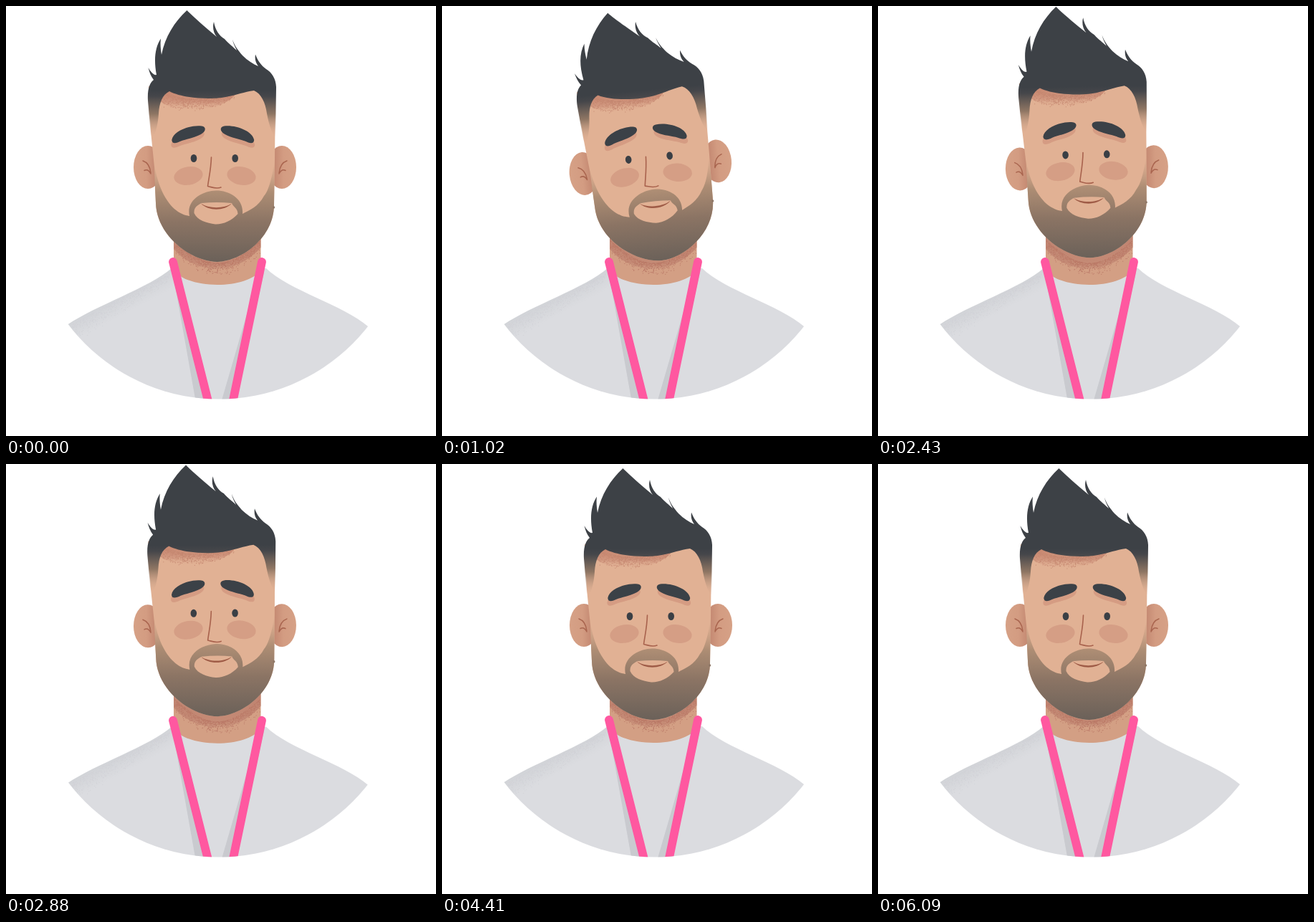
Recreate the animation shown at these times as an HTML page. Size 600 by 600 pixels, loop 6.15 s.

```html
<!DOCTYPE html>
<html lang="en">
<head>
<meta charset="utf-8">
<title>Portrait</title>
<style>
  html, body { margin: 0; width: 100%; height: 100%; overflow: hidden; background: #fff; }
  svg { display: block; width: 100vw; height: 100vh; }
</style>
</head>
<body>
<svg viewBox="0 0 600 600">
  <defs>
    <clipPath id="disc"><circle cx="297" cy="284.5" r="264"/></clipPath>
    <linearGradient id="shirtFill" gradientUnits="userSpaceOnUse" x1="150" y1="411" x2="161" y2="432">
      <stop offset="0" stop-color="#d2d4d8"/>
      <stop offset="1" stop-color="#dbdce0"/>
    </linearGradient>
    <linearGradient id="hairFill" gradientUnits="userSpaceOnUse" x1="0" y1="118" x2="0" y2="184">
      <stop offset="0" stop-color="#3d4146"/>
      <stop offset=".12" stop-color="#45464a"/>
      <stop offset=".5" stop-color="#8b7361" stop-opacity=".95"/>
      <stop offset="1" stop-color="#e1b194" stop-opacity="0"/>
    </linearGradient>
    <linearGradient id="beardFill" gradientUnits="userSpaceOnUse" x1="0" y1="218" x2="0" y2="357">
      <stop offset="0" stop-color="#c49a7e" stop-opacity="0"/>
      <stop offset=".3" stop-color="#ad8d74"/>
      <stop offset=".6" stop-color="#8b7464"/>
      <stop offset="1" stop-color="#6b6159"/>
    </linearGradient>
    <linearGradient id="browShade" gradientUnits="userSpaceOnUse" x1="0" y1="118" x2="0" y2="146">
      <stop offset="0" stop-color="#c6866f"/>
      <stop offset=".55" stop-color="#cd917a" stop-opacity=".85"/>
      <stop offset="1" stop-color="#e1b194" stop-opacity="0"/>
    </linearGradient>
    <linearGradient id="earFill">
      <stop offset="0" stop-color="#d6a186"/>
      <stop offset=".45" stop-color="#d39c82"/>
      <stop offset=".75" stop-color="#c58a73"/>
    </linearGradient>
    <linearGradient id="neckShade" gradientUnits="userSpaceOnUse" x1="0" y1="325" x2="0" y2="370">
      <stop offset="0" stop-color="#c08471"/>
      <stop offset=".7" stop-color="#c48a75"/>
      <stop offset="1" stop-color="#cf9a81"/>
    </linearGradient>
    <g id="ear">
      <ellipse cx="198" cy="225" rx="20" ry="30" fill="url(#earFill)"/>
      <path d="M191 216C197 218 201 223 202 233M193 229.500C197 227.500 200 230 202 234"
        fill="none" stroke="#a9654f" stroke-width="1.500" stroke-linecap="round"/>
    </g>
    <path id="brow" d="M231.300 187C233 174.500 257 165.500 273 167.500C280 168.500 279 175.500 272 179C263 184 252 185.500 244 188.500C237 192 231.500 192.500 231.300 187Z"/>
  </defs>

  <g clip-path="url(#disc)">
    <g id="body">
      <path fill="url(#shirtFill)" d="M60 458L86 444.500C125 418 200 393 231 366L363 366C395 397 472 418 505 447L540 478V620H60Z"/>
      <path id="shoulderDots" stroke="#d0d1d6"/>
      <path fill="#c9cacf" d="M232 368L266.500 562H286L240 372ZM354 368L297.500 562H318L360 372Z"/>
      <path fill="#d39f84" d="M234 290H355.500V368C338 396 252 396 234 368Z"/>
      <path fill="url(#neckShade)" d="M234 310H355.500V337C338 357 316 366 293 367C270 366 248 356 234 339Z"/>
      <path id="neckDots" stroke="#b97866"/>
      <path fill="none" stroke="#ff58a0" stroke-width="11.800" stroke-linecap="round" d="M233 357L285.200 564M357 357L314 564"/>
    </g>
  </g>

  <g id="head">
    <g id="ears">
      <use href="#ear"/>
      <use href="#ear" transform="translate(583 0) scale(-1 1)"/>
    </g>
    <g id="face">
      <path fill="#e1b194" d="M199 112L202 175L207 225L209 275C210 320 258 357 295 357C330 356 374 322 374 278L375 215L376 112Z"/>
      <path fill="url(#browShade)" d="M215 133C219 124 223 119 228 117H322C320 134 285 146 255 145C238 144 224 140 215 133Z"/>
      <path id="lineDots" stroke="#c58770"/>
      <path id="beard" fill="url(#beardFill)" fill-rule="evenodd"/>
      <circle cx="373.500" cy="281" r="1.700" fill="#8f7868"/>
      <path fill="url(#hairFill)" d="M202 180L198 132C197 115 201 107 206 103C202 98 200 92 198.500 86C202 92 206 97 210 96
        C206 74 208 58 216 45.500C215 54 216 61 217 68C222 43 235 22 252.500 6C259 13 275 27 294 43
        C289 37 288 29 290 22C292 34 298 42 305 46C311 53 317 57 322 62C319 56 317 52 316 46.500C319 56 324 62 330 69C337 76 345 81 352 84
        C348 79 347 74 348 67.500C351 76 356 83 363 88C371 93 376.500 101 377 113L376 184
        C371 178 367 166 364 150C362 135 356 122 346 118C332 120 322 124 309 126.500C291 131 249 130 228 119C218 124 214 135 213 150C212 165 209 177 205 184Z"/>
      <g id="features">
        <g fill="#d59e85">
          <ellipse cx="254.500" cy="237" rx="20.300" ry="12.700" transform="rotate(-10 254.500 237)"/>
          <ellipse cx="328.500" cy="237" rx="20.300" ry="12.700" transform="rotate(10 328.500 237)"/>
        </g>
        <path fill="none" stroke="#a8624d" stroke-width="1.600" stroke-linecap="round" stroke-linejoin="round"
          d="M286.500 211C286 228 283 240 281.500 251.500C287 252.500 293 256 300 253"/>
      </g>
      <path id="mouth" fill="#9f5c47" d="M272 275.500C283 283 304 283 315 275.500C305 286.500 282 286.500 272 275.500Z"/>
      <g id="eyes" fill="#3a3f45" stroke="#3a3f45"></g>
      <g id="brows">
        <g id="browL">
          <use href="#brow" y="6.500" x="-1" fill="#d59c83"/>
          <use href="#brow" fill="#3b4147"/>
        </g>
        <g transform="translate(577.500 0) scale(-1 1)">
          <use href="#brow" y="6.500" x="-1" fill="#d59c83"/>
          <use href="#brow" fill="#3b4147"/>
        </g>
      </g>
    </g>
  </g>
</svg>

<script>
const LOOP = 6150, STEP = 30;
const $ = id => document.getElementById(id);

// [time in ms, value], eased between neighbours
const tracks = {
  tilt: [[240, 0], [1080, -5.5], [1890, -5.5], [2580, -0.4], [4000, 0]],
  nod: [[30, 0], [600, -6], [1080, -0.8], [1890, -0.8], [2400, -5.7], [4300, 0],
        [4680, 0], [5310, -9], [5460, -9], [6090, 0]],
  lift: [[30, 0], [510, 2.5], [1000, 0], [2490, 0], [3465, 2], [4410, 0],
         [4680, 0], [5310, -5.5], [5460, -5.5], [6090, 0]],
  raise: [[1380, 0], [1530, -3], [1680, 0], [2700, 0], [3750, -3], [4320, 0],
          [4680, 0], [5310, -8], [5460, -8], [6090, 0]],
  shut: [[4830, 0], [5010, 1], [5580, 1], [5760, 0]]
};

function valueAt(track, t) {
  if (t <= track[0][0]) return track[0][1];
  for (let i = 1; i < track.length; i++) {
    const [t0, a] = track[i - 1], [t1, b] = track[i];
    if (t < t1) {
      const u = (t - t0) / (t1 - t0);
      return a + (b - a) * u * u * (3 - 2 * u);
    }
  }
  return track[track.length - 1][1];
}

let seed = 7;
const rand = () => (seed = seed * 16807 % 2147483647) / 2147483647;

// Stipple below an edge, thinning out with depth
function stipple(id, count, x0, x1, edge, depth) {
  let d = "";
  for (let i = 0; i < count; i++) {
    const u = rand(), x = x0 + (x1 - x0) * u;
    const y = edge(u) + rand() * rand() * depth(u);
    d += `M${x.toFixed(1)} ${y.toFixed(1)}h1`;
  }
  $(id).setAttribute("d", d);
}
const bow = u => Math.sin(Math.PI * u);
stipple("shoulderDots", 800, 92, 228, u => 444 - 70 * u - bow(u), u => 32 - 20 * u);
stipple("neckDots", 750, 235, 354, u => 328 + 31 * bow(u), () => 20);
stipple("lineDots", 700, 217, 318, u => 121 + 9 * bow(u), u => 22 * (1 - u * .45));

const eyes = [262, 319.7].map(x => {
  const g = document.createElementNS("http://www.w3.org/2000/svg", "g");
  g.innerHTML = `<ellipse cx="${x}" cy="212.5" rx="4.3" ry="5.5" stroke="none"/>
    <path d="M${x - 6} 212.300Q${x} 209.500 ${x + 6} 212" fill="none" stroke-width="3.600" stroke-linecap="round"/>`;
  $("eyes").append(g);
  return { open: g.children[0], closed: g.children[1] };
});

function beardPath(m) {
  const p = (x, y) => `${x} ${y + m} `;
  return "M206 215L209 275C210 320 258 357 295 357C330 356 374 322 374 278L375 215" +
    "C" + p(371, 242) + p(366, 258) + p(360, 265) +
    "C" + p(352, 280) + p(340, 285) + p(330, 290) +
    "C" + p(332, 268) + p(310, 257) + p(293, 257.5) +
    "C" + p(275, 258) + p(251, 270) + p(256, 293) +
    "C" + p(238, 291) + p(214, 272) + "206 215Z" +
    "M" + p(262.5, 289) +
    "C" + p(262, 281) + p(267, 278) + p(273, 275) +
    "Q" + p(294, 273) + p(315, 275) +
    "C" + p(317, 281) + p(323, 281) + p(323.5, 290) +
    "C" + p(315, 300) + p(302, 305) + p(292, 304.5) +
    "C" + p(280, 303) + p(267, 299) + p(262.5, 289) + "Z";
}

const shift = (id, y) => $(id).setAttribute("transform", `translate(0 ${y})`);

function draw(t) {
  const v = {};
  for (const k in tracks) v[k] = valueAt(tracks[k], t);
  shift("body", v.lift);
  $("head").setAttribute("transform", `rotate(${v.tilt} 291 232)`);
  shift("ears", -0.15 * v.nod);
  shift("face", v.nod);
  shift("features", 0.15 * v.nod);
  shift("eyes", -0.1 * v.nod);
  shift("mouth", 0.4 * v.nod);
  $("beard").setAttribute("d", beardPath(0.35 * v.nod));
  shift("brows", v.raise);
  $("browL").setAttribute("transform", `rotate(${0.6 * v.raise} 255 179)`);
  const closed = v.shut > 0.8;
  for (const eye of eyes) {
    eye.open.setAttribute("ry", 5.5 * (1 - v.shut));
    eye.open.style.display = closed ? "none" : "";
    eye.closed.style.display = closed ? "" : "none";
  }
}

const start = performance.now();
function tick(now) {
  const t = Math.max(0, now - start) % LOOP;
  draw(Math.floor(t / STEP) * STEP);
  requestAnimationFrame(tick);
}
draw(0);
requestAnimationFrame(tick);
</script>
</body>
</html>
```
